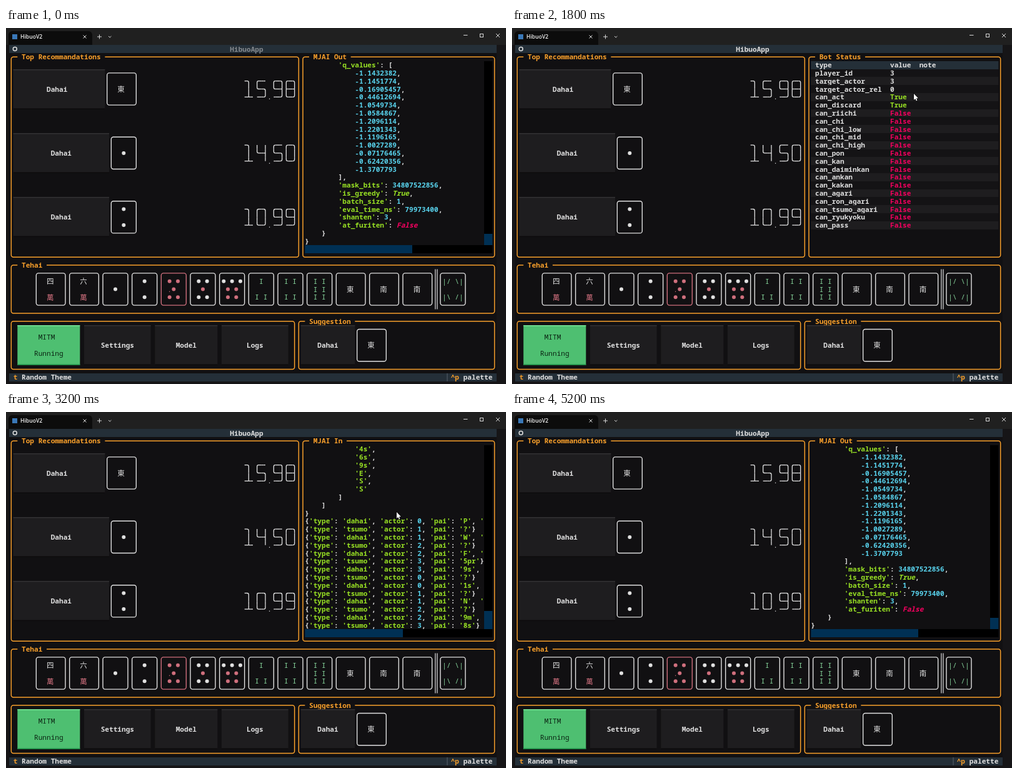
Recreate the animation shown at these times as an HTML page with a canvas. Size 800 by 569 pixels, loop 5.4 s.

```html
<!DOCTYPE html>
<html lang="en">
<head>
<meta charset="utf-8">
<title>HibuoApp</title>
<style>
html, body { margin: 0; width: 100%; height: 100%; overflow: hidden; background: #0c0c0c; }
canvas { display: block; width: 800px; height: 569px; }
</style>
</head>
<body>
<canvas id="stage"></canvas>
<script>
(() => {
const W = 800, H = 569, LOOP = 5400, STEP = 200;
const CW = 20 / 3, RH = 12.8;
const MONO = '11.11px "Noto Sans Mono", "DejaVu Sans Mono", monospace';
const CJK = '11.5px "Noto Sans CJK JP", "Noto Sans CJK", "Noto Sans CJK SC", sans-serif';
const BG = '#111012', PANEL = '#242f38', FG = '#e0e0e0', ACCENT = '#f79f2b';
const ROSE = '#cf6f7d', MINT = '#86d49b', LIME = '#98e024', CYAN = '#58d1eb', RED = '#f4005f';
const BUTTON = ['#1e1d1f', '#333234', '#0c0b0c'];
const GREEN = ['#4ebf71', '#7be79a', '#1d8a45'];

const canvas = document.getElementById('stage');
const dpr = window.devicePixelRatio || 1;
canvas.width = W * dpr;
canvas.height = H * dpr;
const g = canvas.getContext('2d');
g.scale(dpr, dpr);

// The terminal is a grid of cells: left edge, cell centre, row centre, row top.
const left = c => 5 + c * CW;
const midX = c => left(c) + CW / 2;
const midY = r => 33.5 + r * RH;
const rowTop = r => midY(r) - RH / 2;

function rect(x, y, w, h, color) {
  g.fillStyle = color;
  g.fillRect(x, y, w, h);
}

function cells(c0, c1, r0, r1, color) {
  const y = Math.round(rowTop(r0));
  rect(left(c0), y, (c1 - c0) * CW, Math.round(rowTop(r1)) - y, color);
}

function line(points, color, width) {
  g.strokeStyle = color;
  g.lineWidth = width;
  g.beginPath();
  points.forEach(([x, y], i) => i ? g.lineTo(x, y) : g.moveTo(x, y));
  g.stroke();
}

function text(str, c, r, color = FG, style = '600', limit = 999) {
  g.font = style + ' ' + MONO;
  g.fillStyle = color;
  g.textAlign = 'left';
  [...str].forEach((ch, i) => {
    if (ch !== ' ' && c + i < limit) g.fillText(ch, left(c + i), midY(r) + 4);
  });
}

function kanji(ch, c, r, color = FG) {
  g.font = CJK;
  g.fillStyle = color;
  g.textAlign = 'left';
  g.fillText(ch, left(c), midY(r) + 4.2);
}

function dot(c, r, color = FG) {
  g.fillStyle = color;
  g.beginPath();
  g.arc(midX(c), midY(r), 3, 0, Math.PI * 2);
  g.fill();
}

function frame(c0, c1, r0, r1, color, width = 1.4) {
  g.strokeStyle = color;
  g.lineWidth = width;
  g.beginPath();
  g.roundRect(midX(c0), midY(r0), (c1 - c0) * CW, (r1 - r0) * RH, 3.5);
  g.stroke();
}

function panel(c0, c1, r0, r1, title) {
  frame(c0, c1, r0, r1, ACCENT, 1.5);
  if (!title) return;
  rect(left(c0 + 2), midY(r0) - 4, (title.length + 2) * CW, 8, BG);
  text(title, c0 + 3, r0, ACCENT);
}

function button(c0, c1, r, [face, light, dark]) {
  cells(c0, c1, r, r + 5, face);
  const w = (c1 - c0) * CW;
  rect(left(c0), Math.round(rowTop(r)), w, 1.5, light);
  rect(left(c0), Math.round(rowTop(r + 5)) - 1.5, w, 1.5, dark);
}

// Large digits built from box-drawing strokes.
const STROKES = {
  '╭': 'rd', '╮': 'ld', '╰': 'ru', '╯': 'lu', '─': 'lr', '│': 'ud',
  '╶': 'r', '╴': 'l', '╵': 'u', '╷': 'd', '┤': 'udl', '├': 'udr', '┴': 'lru'
};
const DIGITS = {
  0: ['╭─╮', '│ │', '╰─╯'], 1: ['╶╮ ', ' │ ', '╶┴╴'],
  4: ['╷ ╷', '╰─┤', '  ╵'], 5: ['╭─╴', '╰─╮', '╶─╯'],
  8: ['╭─╮', '├─┤', '╰─╯'], 9: ['╭─╮', '╰─┤', '╶─╯']
};

function stroke(ch, c, r) {
  const x = midX(c), y = midY(r);
  const ends = {
    l: [x - CW / 2, y], r: [x + CW / 2, y],
    u: [x, y - RH / 2], d: [x, y + RH / 2]
  };
  const dirs = STROKES[ch];
  if (!dirs) return;
  if ('╭╮╰╯'.includes(ch)) {
    g.strokeStyle = FG;
    g.lineWidth = 1.3;
    g.beginPath();
    g.moveTo(...ends[dirs[0]]);
    g.arcTo(x, y, ...ends[dirs[1]], 2.6);
    g.lineTo(...ends[dirs[1]]);
    g.stroke();
  } else {
    for (const d of dirs) line([[x, y], ends[d]], FG, 1.3);
  }
}

function digits(value, c, r) {
  for (const ch of value) {
    if (ch === '.') {
      text('.', c++, r + 2, FG, '400');
      continue;
    }
    DIGITS[ch].forEach((row, j) => [...row].forEach((s, i) => stroke(s, c + i, r + j)));
    c += 3;
  }
}

function recommend(r, c, value) {
  button(1, c, r, BUTTON);
  text('Dahai', c === 23 ? 9 : 10, r + 2);
  frame(c, 30, r, r + 4, FG);
  digits(value, 56, r + 1);
}

function honor(c, r, ch) {
  frame(c, c + 7, r, r + 4, FG);
  kanji(ch, c + 3, r + 2);
}

function character(c, ch) {
  frame(c, c + 7, 28, 32, FG);
  kanji(ch, c + 3, 29);
  kanji('萬', c + 3, 31, ROSE);
}

// Each row is a string of five cells: o = dot, r = rose dot, others are glyphs.
function suit(c, rows, edge = FG) {
  frame(c, c + 6, 28, 32, edge);
  rows.forEach((row, j) => [...row].forEach((ch, i) => {
    const x = c + 1 + i, y = 29 + j;
    if (ch === 'o') dot(x, y);
    else if (ch === 'r') dot(x, y, ROSE);
    else if (ch === '.') text(ch, x, y, ROSE, '400');
    else text(ch, x, y, MINT, '400');
  }));
}

function hand() {
  panel(0, 116, 27, 33, 'Tehai');
  character(6, '四');
  character(14, '六');
  suit(22, ['', '  o', '']);
  suit(29, ['  o', '', '  o']);
  suit(36, [' r r', ' .r', ' r r'], ROSE);
  suit(43, [' o o', '  r', ' o o']);
  suit(50, ['o o o', ' r r', ' r r']);
  suit(57, ['  I', '', ' I I']);
  suit(64, [' I I', '', ' I I']);
  suit(71, [' I I', ' I I', ' I I']);
  honor(78, 28, '東');
  honor(86, 28, '南');
  honor(94, 28, '南');
  for (const x of [686.9, 690]) line([[x, rowTop(28)], [x, rowTop(33)]], FG, 1.2);
  suit(103, ['|/ \\|', '', '|\\ /|']);
}

function controls() {
  panel(0, 68, 34, 40);
  button(2, 17, 35, GREEN);
  text('MITM', 7, 36, '#0b2413', '500');
  text('Running', 6, 38, '#0b2413', '500');
  for (const [a, b, at, label] of [
    [18, 34, 22, 'Settings'], [35, 50, 40, 'Model'], [51, 67, 57, 'Logs']
  ]) {
    button(a, b, 35, BUTTON);
    text(label, at, 37);
  }
  panel(69, 116, 34, 40, 'Suggestion');
  button(70, 83, 35, BUTTON);
  text('Dahai', 74, 37);
  honor(83, 35, '東');
}

function tabBar() {
  rect(0, 0, W, 27, '#202020');
  g.fillStyle = '#0c0c0c';
  g.beginPath();
  g.roundRect(4, 5, 134, 22, [6, 6, 0, 0]);
  g.fill();
  rect(10, 10, 8, 8, '#3a78b8');
  g.font = '600 8.6px "Open Sans", "Noto Sans", sans-serif';
  g.fillStyle = '#f2f2f2';
  g.textAlign = 'left';
  g.fillText('HibuoV2', 23, 17.3);
  const ink = '#d8d8d8';
  const cross = (x, y, s) => {
    line([[x - s, y - s], [x + s, y + s]], ink, 1);
    line([[x - s, y + s], [x + s, y - s]], ink, 1);
  };
  cross(126, 14, 2.5);
  line([[146, 14], [153, 14]], ink, 1);
  line([[149.5, 10.5], [149.5, 17.5]], ink, 1);
  line([[164, 13], [166.2, 15.2], [168.4, 13]], ink, 1);
  line([[732, 11.5], [738.5, 11.5]], ink, 1);
  g.strokeRect(758.5, 9.5, 5, 5);
  cross(787, 12, 3);
}

function json(str, r) {
  let c = 71;
  for (const tok of str.match(/'[^']*'|-?\d[\d.]*|True|False|./g)) {
    const word = tok === 'True' || tok === 'False';
    const color = tok[0] === "'" || tok === 'True' ? LIME
      : tok === 'False' ? RED
      : /\d/.test(tok) ? CYAN : FG;
    text(tok, c, r, color, word ? 'italic 600' : '600', 114);
    c += tok.length;
  }
}

function log(lines, thumbTop, thumbRight) {
  lines.forEach((s, i) => json(s, i + 2));
  cells(114, 116, 2, 25, '#000');
  cells(71, 116, 25, 26, '#000');
  rect(left(114), thumbTop, 2 * CW, 347 - thumbTop, '#003054');
  rect(left(71), 347, thumbRight - left(71), 13, '#003054');
}

const pad = n => ' '.repeat(n);
const qValues = ('-1.1432382 -1.1451774 -0.16905457 -0.44612694 -1.0549734 -1.0584867 -1.2096114 ' +
  '-1.2201343 -1.1196165 -1.0027289 -0.07176465 -0.62420356 -1.3707793').split(' ');
const outLines = [
  pad(8) + "'q_values': [",
  ...qValues.map((q, i) => pad(12) + q + (i < qValues.length - 1 ? ',' : '')),
  pad(8) + '],',
  ...["'mask_bits': 34807522856,", "'is_greedy': True,", "'batch_size': 1,",
    "'eval_time_ns': 79973400,", "'shanten': 3,", "'at_furiten': False"].map(s => pad(8) + s),
  pad(4) + '}', '}'
];

const moves = '0P 1? 1W 2? 2F 3-5pr 3-9s 0? 0-1s 1? 1N 2? 2-9m 3-8s'.split(' ');
const inLines = [
  ...['4s', '6s', '9s', 'E', 'S', 'S'].map((p, i) => pad(12) + `'${p}'` + (i < 5 ? ',' : '')),
  pad(8) + ']', pad(4) + ']', '}',
  ...moves.map((m, i) => {
    const draw = i % 2;
    const pai = m.slice(1).replace('-', '');
    return `{'type': '${draw ? 'tsumo' : 'dahai'}', 'actor': ${m[0]}, 'pai': '${pai}'` +
      (draw ? '}' : ", 'tsumogiri': False}");
  })
];

const flags = ('act discard riichi chi chi_low chi_mid chi_high pon kan daiminkan ankan kakan ' +
  'agari ron_agari tsumo_agari ryukyoku pass').split(' ');
const statusRows = [
  ['player_id', '3'], ['target_actor', '3'], ['target_actor_rel', '0'],
  ...flags.map((f, i) => ['can_' + f, i < 2 ? 'True' : 'False'])
];

function statusTable() {
  cells(71, 116, 2, 3, PANEL);
  text('type', 72, 2);
  text('value', 90, 2);
  text('note', 97, 2);
  statusRows.forEach(([name, value], i) => {
    const r = i + 3;
    cells(71, 116, r, r + 1, i % 2 ? '#1e1d1f' : '#141315');
    text(name, 72, r);
    text(value, 90, r, { True: LIME, False: RED }[value] || FG);
  });
}

const views = {
  out: ['MJAI Out', () => log(outLines, 329, 650)],
  in: ['MJAI In', () => log(inLines, 318, 635)],
  status: ['Bot Status', statusTable]
};
const schedule = [
  [0, 'out'], [1200, 'in'], [1800, 'status'], [2600, 'out'],
  [3200, 'in'], [3800, 'status'], [4400, 'out']
];

// Pointer stops: time, x, y.
const path = [
  [400, 770, 62], [1000, 643, 105], [2000, 643, 105],
  [2400, 625, 160], [4800, 625, 160], [5200, 792, 190]
];

function pointerAt(t) {
  const i = path.findIndex(p => p[0] > t);
  if (i < 1) return null;
  const [t0, x0, y0] = path[i - 1], [t1, x1, y1] = path[i];
  const u = (t - t0) / (t1 - t0), e = u * u * (3 - 2 * u);
  return [x0 + (x1 - x0) * e, y0 + (y1 - y0) * e];
}

function pointer([x, y]) {
  g.beginPath();
  [[0, 0], [0, 10], [2.3, 8], [3.8, 11.4], [5.4, 10.7], [3.9, 7.4], [7, 7.2]]
    .forEach(([dx, dy]) => g.lineTo(x + dx, y + dy));
  g.closePath();
  g.strokeStyle = '#000';
  g.lineWidth = 1.2;
  g.stroke();
  g.fillStyle = '#fff';
  g.fill();
}

function render(t) {
  rect(0, 0, W, H, '#161517');
  cells(0, 117, 0, 42, BG);
  tabBar();

  cells(0, 117, 0, 1, PANEL);
  g.strokeStyle = FG;
  g.lineWidth = 1.5;
  g.beginPath();
  g.arc(14.3, 33.5, 3, 0, Math.PI * 2);
  g.stroke();
  text('HibuoApp', 53, 0, t < 1200 ? '#858a8f' : FG);

  panel(0, 69, 1, 26, 'Top Recommandations');
  recommend(3, 23, '15.98');
  kanji('東', 26, 5);
  recommend(11, 24, '14.50');
  dot(27, 13);
  recommend(19, 24, '10.99');
  dot(27, 20);
  dot(27, 22);

  const [title, body] = views[schedule.filter(s => s[0] <= t).pop()[1]];
  panel(70, 116, 1, 26, title);
  body();

  hand();
  controls();

  cells(0, 117, 41, 42, PANEL);
  text('t', 1, 41, ACCENT);
  text('Random Theme', 3, 41);
  rect(left(105) + 0.5, rowTop(41), 1, RH, '#56616a');
  text('^p', 106, 41, ACCENT);
  text('palette', 109, 41);

  const at = pointerAt(t);
  if (at) pointer(at);
}

const start = performance.now();
let shown = -1;
function tick() {
  const t = Math.floor(((performance.now() - start) % LOOP) / STEP) * STEP;
  if (t !== shown) {
    shown = t;
    render(t);
  }
  requestAnimationFrame(tick);
}
tick();
})();
</script>
</body>
</html>
```
